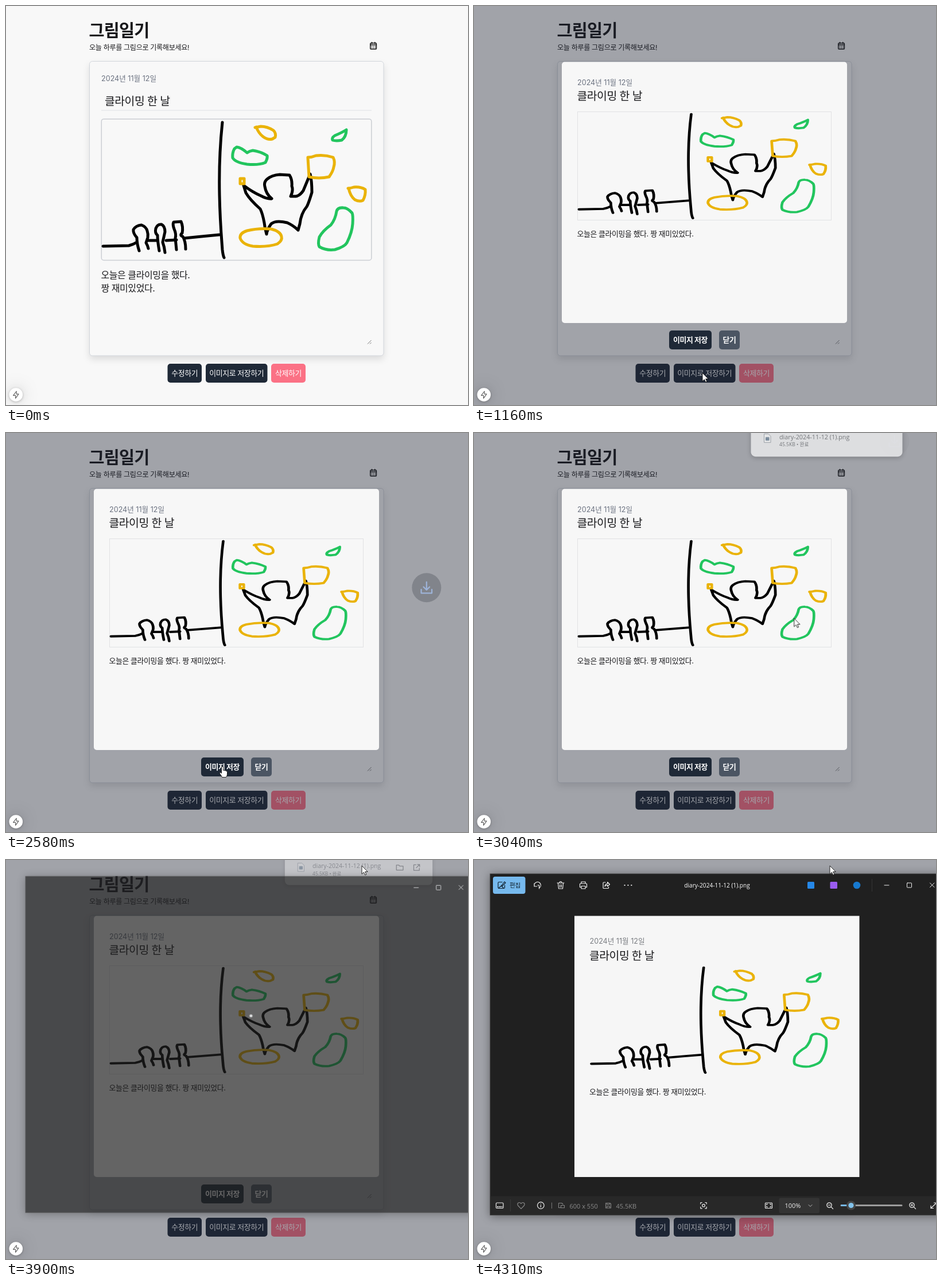
Write an HTML page that moves like this. It is 805x696 px and loops after 4510 ms.

```html
<!DOCTYPE html>
<html lang="ko">
<head>
<meta charset="utf-8">
<title>그림일기</title>
<style>
html, body { margin: 0; width: 100%; height: 100%; overflow: hidden; background: #f8f8f8; }
svg { display: block; }
text { font-family: Inter, "Noto Sans CJK KR", "Noto Sans CJK", sans-serif; white-space: pre; }
.ko { letter-spacing: -.028em; }
.ui { font-family: "Open Sans", "Noto Sans", "Noto Sans CJK KR", sans-serif; }
.line { fill: none; stroke-linecap: round; stroke-linejoin: round; }
.card { filter: drop-shadow(0 6px 6px rgba(0,0,0,.11)); }
.dev { filter: drop-shadow(0 0 14px rgba(0,0,0,.17)) drop-shadow(0 1px 2px rgba(0,0,0,.25)); }

.modal, .disc, .popup, .hover, .win, .ring, .content, .busy, .knob, .fill, .cursor, .arrow, .hand, .tap {
  animation: 4510ms linear infinite both;
}
.modal { animation-name: modal; }
.disc { animation-name: disc; }
.popup { animation-name: popup; transform-origin: 614.5px 0; }
.win { animation-name: win; transform-origin: 426px 322px; }
.ring { animation-name: ring; transform-origin: 426px 290px; }
.cursor { animation-name: cursor; }
.arrow { animation-name: arrow; }
.hand { animation-name: hand; }
.tap { animation-name: tap; }
.hover { animation-name: hover; }
.content { animation-name: content; }
.busy { animation-name: busy; }
.knob { animation-name: knob; }
.fill { animation-name: fill; stroke-dasharray: 18 40; }
.arrow, .hand, .tap, .hover, .content, .busy, .knob, .fill { animation-timing-function: step-end; }

@keyframes modal {
  0%, 20.7% { opacity: 0; }
  25.2%, 100% { opacity: 1; }
}
@keyframes disc {
  0%, 57.1% { opacity: 0; transform: none; }
  57.2% { opacity: 1; transform: none; }
  60.5% { opacity: 1; transform: none; animation-timing-function: ease-in; }
  66% { opacity: .6; transform: translateY(-200px); }
  67.8%, 100% { opacity: 0; transform: translateY(-270px); }
}
@keyframes popup {
  0%, 65% { opacity: 0; transform: translateY(-16px); }
  68.2%, 85% { opacity: 1; transform: none; }
  86.47% { opacity: .45; transform: scale(.975); }
  87.6%, 100% { opacity: 0; transform: scale(.955); }
}
@keyframes win {
  0%, 85.2% { opacity: 0; transform: scale(.96); }
  86.47% { opacity: .68; transform: scale(.985); }
  88.2%, 100% { opacity: 1; transform: none; }
}
@keyframes ring {
  0%, 86.4% { transform: rotate(-90deg); stroke: #ddd; stroke-dasharray: .1 200; }
  89.8% { transform: rotate(-14deg); stroke: #76b9ed; stroke-dasharray: 10.5 200; }
  92.2% { transform: rotate(60deg); stroke: #76b9ed; stroke-dasharray: 30 200; visibility: visible; }
  92.24%, 100% { transform: rotate(60deg); stroke: #76b9ed; stroke-dasharray: 30 200; visibility: hidden; }
}
@keyframes cursor {
  0%, 8.65% { transform: translate(779px, 690px); }
  12% { transform: translate(660px, 606px); }
  15.2% { transform: translate(490px, 566px); }
  17.6% { transform: translate(386px, 594px); animation-timing-function: ease-out; }
  20.18%, 30% { transform: translate(398px, 640px); animation-timing-function: ease-in-out; }
  39.4%, 42% { transform: translate(390px, 590px); }
  45%, 57.5% { transform: translate(377px, 582px); animation-timing-function: ease-in-out; }
  68.29%, 69.84% { transform: translate(560px, 320px); animation-timing-function: ease-in-out; }
  80.93%, 100% { transform: translate(620px, 10px); }
}
@keyframes arrow {
  0% { visibility: hidden; }
  8.65% { visibility: visible; }
  19.1% { visibility: hidden; }
  21.29% { visibility: visible; }
  37.5% { visibility: hidden; }
  58.8%, 100% { visibility: visible; }
}
@keyframes hand {
  0% { visibility: hidden; }
  19.1% { visibility: visible; }
  21.29% { visibility: hidden; }
  37.5% { visibility: visible; }
  58.8%, 100% { visibility: hidden; }
}
@keyframes tap {
  0% { visibility: hidden; }
  51.66% { visibility: visible; }
  52.77%, 100% { visibility: hidden; }
}
@keyframes hover {
  0% { visibility: hidden; }
  79.8%, 100% { visibility: visible; }
}
@keyframes content {
  0% { visibility: hidden; }
  92.24%, 100% { visibility: visible; }
}
@keyframes busy {
  0% { visibility: hidden; }
  87.58% { visibility: visible; }
  94.46%, 100% { visibility: hidden; }
}
@keyframes knob {
  0% { transform: translateX(-12px); }
  95.56%, 100% { transform: none; }
}
@keyframes fill {
  0% { stroke-dashoffset: 12; }
  95.56%, 100% { stroke-dashoffset: 0; }
}
</style>
</head>
<body>
<svg width="805" height="696" viewBox="0 0 805 696">
  <defs>
    <g id="art" class="line" stroke-width="5">
      <g stroke="#000">
        <path d="M377 203C373 240 371 280 372 330C373 380 376 410 377 425Q378 435 380 439"/>
        <path d="M169 419L214 418Q222 416 228 412M246 409H263M279 409L297 408M311 405Q340 402 372 399"/>
        <path d="M232 427Q228 415 228 404Q221 396 222 390Q226 383 236 382Q244 385 246 392Q248 398 247 404L244 413Q247 418 248 423"/>
        <path d="M267 427Q264 410 264 400Q259 396 261 388Q264 380 271 381Q277 384 277 394L273 412Q276 420 277 430"/>
        <path d="M297 425L295 405Q297 398 293 389Q290 381 292 377L305 376Q309 385 307 396Q302 400 308 402Q313 410 313 424"/>
        <path d="M463 336Q453 328 451 315Q449 307 455 302Q463 295 477 294L494 295Q499 303 498 314Q501 322 496 332L505 332Q512 331 518 322L530 293Q533 305 533 325Q527 345 524 350Q514 362 512 380L509 391Q501 383 490 378Q470 373 462 380Q455 390 454 398Q451 388 450 378Q447 362 443 354Q425 338 418 326L414 313Q430 325 444 331Q455 337 463 336"/>
      </g>
      <g stroke="#eab308">
        <path d="M436 211Q440 222 448 228Q456 234 464 232L469 229Q471 222 466 217Q455 210 444 210L434 212"/>
        <path d="M526 265L528 298Q545 302 563 298Q570 288 571 281Q574 272 570 264Q555 259 540 261Q533 264 526 264"/>
        <path d="M408 301H415V310H408Z"/>
        <path d="M597 318Q600 332 608 338Q616 342 622 339Q627 330 626 320Q618 315 606 316Q600 318 596 318"/>
        <path d="M420 392Q407 396 408 405Q412 416 430 419Q455 421 473 415Q482 409 480 402Q478 393 462 389Q440 387 420 392Z"/>
      </g>
      <g stroke="#22c55e">
        <path d="M398 249Q394 256 395 265Q400 273 420 276Q440 278 452 273Q456 266 455 261Q444 254 430 252Q424 253 420 256Q410 247 402 246Z"/>
        <path d="M593 216Q593 228 585 234Q575 236 569 234Q567 230 573 226Q585 221 593 216"/>
        <path d="M588 352Q578 351 576 358Q574 372 566 382Q552 392 546 403Q543 415 546 420Q558 427 573 425Q590 420 594 413Q603 395 604 380Q605 365 603 361Q595 352 588 352Z"/>
      </g>
    </g>
    <g id="folder" class="line" stroke-width="1.3">
      <path d="M-6 -4.5H-2L0 -2.5H6V4.5H-6Z"/>
    </g>
    <g id="lens" class="line" stroke-width="1.2">
      <circle cx="-1" cy="-1" r="4.2"/><path d="M2.2 2.2L5.5 5.5M-3 -1H1"/>
    </g>
  </defs>

  <rect width="805" height="696" fill="#f8f8f8"/>
  <text class="ko" x="144.5" y="53" font-size="29.4" font-weight="800" fill="#18181b">그림일기</text>
  <text class="ko" x="145" y="76.5" font-size="12.1" fill="#18181b">오늘 하루를 그림으로 기록해보세요!</text>
  <g class="line" stroke="#111" stroke-width="1.5">
    <rect x="634.8" y="64.8" width="10.6" height="10.4" rx="1.3"/>
    <path d="M635 67.8H645M637.5 63.2V65.5M642.7 63.2V65.5"/>
    <path d="M637.4 70.5H643.5M637.4 73H643.5" stroke-dasharray=".1 2.9"/>
  </g>
  <rect class="card" x="145.5" y="96.5" width="512.5" height="513.5" rx="5" fill="#f8f8f8" stroke="#d1d5db"/>
  <text x="166" y="130.5" font-size="12.6" fill="#6b7280">2024년 11월 12일</text>
  <text class="ko" x="172" y="173" font-size="19.4" fill="#18181b">클라이밍 한 날</text>
  <path d="M166 182H637" stroke="#dfe1e5"/>
  <rect x="166.3" y="197.2" width="470.5" height="246.3" rx="4" fill="none" stroke="#cbced4" stroke-width="1.5"/>
  <use href="#art"/>
  <text class="ko" font-size="16" fill="#18181b"><tspan x="165.5" y="475">오늘은 클라이밍을 했다.</tspan><tspan x="165.5" y="498">짱 재미있었다.</tspan></text>
  <path d="M630 589.5L636.5 583M634 589.5L636.5 587" stroke="#666" stroke-width=".9"/>
  <g fill="#1f2937">
    <rect x="281.5" y="624" width="59.5" height="33" rx="5"/>
    <rect x="348" y="624" width="107.5" height="33" rx="5"/>
    <rect x="462" y="624" width="60" height="33" rx="5" fill="#fb7185"/>
  </g>
  <g class="ko" font-size="12.9" font-weight="500" fill="#fff" text-anchor="middle">
    <text x="311.3" y="644.8">수정하기</text>
    <text x="401.7" y="644.8">이미지로 저장하기</text>
    <text x="492" y="644.8">삭제하기</text>
  </g>

  <g class="modal">
    <rect width="805" height="696" fill="#1f2533" fill-opacity=".4"/>
    <rect x="153" y="97.5" width="497" height="455.5" rx="5" fill="#f7f7f7"/>
    <text x="180" y="137.8" font-size="12.6" fill="#6b7280">2024년 11월 12일</text>
    <text class="ko" x="179.5" y="164" font-size="19.4" fill="#18181b">클라이밍 한 날</text>
    <rect x="180.5" y="184.5" width="442" height="189" fill="none" stroke="#e1e2e4"/>
    <use href="#art" transform="translate(23.9 32.5) scale(.9406 .769)"/>
    <text class="ko" x="179.5" y="401.5" font-size="12.85" fill="#18181b">오늘은 클라이밍을 했다. 짱 재미있었다.</text>
    <rect x="340" y="566" width="74" height="33" rx="5" fill="#1f2937"/>
    <rect x="427" y="566" width="36" height="33" rx="5" fill="#4b5563"/>
    <g class="ko" font-size="12.9" font-weight="700" fill="#fff" text-anchor="middle">
      <text x="377" y="586.8">이미지 저장</text>
      <text x="445" y="586.8">닫기</text>
    </g>
  </g>

  <g class="dev">
    <circle cx="17.3" cy="678" r="11.8" fill="#fff"/>
    <path class="line" d="M18.2 672L12.6 679.3H16.6V684.3L22 676.8H18.2Z" stroke="#666" stroke-width="1.2"/>
  </g>

  <g class="disc">
    <circle cx="732.8" cy="269.8" r="25.5" fill="#81848b"/>
    <path class="line" d="M732.8 260V273M727.5 268.5L732.8 273.8L738 268.5M723.5 273V279.3H742V273" stroke="#9db3d8" stroke-width="2.3"/>
  </g>

  <g class="popup">
    <rect x="482.5" y="-40" width="264" height="85" rx="8" fill="#f1f1f2" style="filter:drop-shadow(0 2px 4px rgba(0,0,0,.3))"/>
    <path d="M505.5 5.5H513L517 9.5V20.5H505.5Z" fill="#fafafa" stroke="#9aa0a8"/>
    <rect x="508" y="11" width="6.5" height="6" rx="1" fill="#71869b"/>
    <g class="ui" fill="#66686c">
      <text class="ui" x="532" y="14.8" font-size="10.8">diary-2024-11-12 (1).png</text>
      <text class="ui" x="532" y="27.3" font-size="8.6">45.5KB • 완료</text>
    </g>
    <g class="hover" stroke="#606266">
      <use href="#folder" x="688" y="13.5"/>
      <path class="line" d="M717 8.5H713V18.5H723V14.5M719.5 8H723.5V12M723.3 8.2L717.5 14" stroke-width="1.3"/>
    </g>
  </g>

  <g class="win">
    <rect x="28" y="24" width="796" height="595.5" fill="#202020" stroke="#4a4a4a" stroke-width=".8" style="filter:drop-shadow(0 2px 8px rgba(0,0,0,.4))"/>
    <g class="line" stroke="#eee" stroke-width="1">
      <path d="M715 44H723M794.5 40L802 47.5M802 40L794.5 47.5"/>
      <rect x="754.5" y="40" width="8" height="8" rx=".8"/>
    </g>
    <circle class="line ring" cx="426" cy="290" r="19" stroke-width="5"/>

    <g class="content">
      <rect x="33" y="29" width="56.5" height="30" rx="4" fill="#76b9ed"/>
      <g class="line" stroke="#10202c" stroke-width="1.2">
        <path d="M49 38.5H43.5Q42 38.5 42 40V48Q42 49.5 43.5 49.5H52Q53.5 49.5 53.5 48V44M43 49L47.5 45L51.5 49M48 44.5L53 38L55 39.8L49.5 45Z"/>
      </g>
      <text class="ko" x="62" y="48" font-size="10.6" fill="#10202c">편집</text>
      <g class="line" stroke="#f2f2f2" stroke-width="1.2">
        <path d="M105.5 46A5.6 5.6 0 1 1 114 48.5M105 41V46H110M111 44H113.5V50"/>
        <path d="M145 40H157M149 40Q149 37.5 151 37.5Q153 37.5 153 40M146.5 40.5L147.5 50H154.5L155.500 40.5M149.700 43V47.500M152.300 43V47.500"/>
        <path d="M187 41V38H194V41M187 47.5H184.500V42Q184.500 41 185.500 41H195.500Q196.500 41 196.500 42V47.500H194M187 45.500H194V50H187Z"/>
        <path d="M229 39H226Q225 39 225 40V48.500Q225 49.500 226 49.500H233.500Q234.500 49.500 234.500 48.500V47M228 46Q228.500 41.500 232.500 41.500V38.500L236.500 42.500L232.500 46V43.700Q229.500 43.700 228 46"/>
        <path d="M262.500 44H275" stroke-width="2.200" stroke-dasharray=".1 5.800"/>
      </g>
      <text class="ui" x="423.5" y="47.8" font-size="10.1" fill="#fff" text-anchor="middle">diary-2024-11-12 (1).png</text>
      <rect x="581" y="38" width="12" height="12" rx="1.5" fill="#2688e8"/>
      <rect x="620.5" y="38" width="12.5" height="12" rx="1.5" fill="#9a5cf0"/>
      <circle cx="667" cy="44" r="6.3" fill="#1779cf"/>
      <path d="M693.5 33V55" stroke="#343434"/>

      <rect x="175" y="97.5" width="496.500" height="455.500" fill="#f6f6f6"/>
      <text x="201.500" y="145.500" font-size="12.6" fill="#7a7d82">2024년 11월 12일</text>
      <text class="ko" x="201" y="174" font-size="19.4" font-weight="500" fill="#18181b">클라이밍 한 날</text>
      <use href="#art" transform="translate(45.6 29.9) scale(.9406 .777)"/>
      <text class="ko" x="201" y="409" font-size="12.85" fill="#18181b">오늘은 클라이밍을 했다. 짱 재미있었다.</text>

      <rect x="28.500" y="586.500" width="795" height="32.500" fill="#282828"/>
      <path d="M63.500 592V613" stroke="#3a3a3a"/>
      <path d="M135.500 597.500V608" stroke="#777"/>
      <g class="line" stroke="#eee" stroke-width="1.200">
        <rect x="38.500" y="598" width="12.500" height="9.500" rx="1.500"/>
        <path d="M41 605H48.500" stroke-width="2" stroke-dasharray="1 2.700"/>
        <path d="M82 608.300L76.800 603Q74.800 600 77.200 598Q80 596.500 82 599.500Q84 596.500 86.800 598Q89.200 600 87.200 603Z" stroke="#888"/>
        <circle cx="116.300" cy="602.500" r="5.800"/>
        <path d="M116.300 602V605.500M116.300 599.700V599.800"/>
        <path d="M394.800 600V597.500H397.300M402.700 597.500H405.200V600M405.200 605V607.800H402.700M397.300 607.800H394.800V605"/>
        <circle cx="400" cy="602.700" r="2.300"/>
        <rect x="507.500" y="598" width="12" height="9.500" rx="1"/>
        <path d="M509.800 601.500V600.200H511.200M515.800 600.200H517.200V601.500M517.200 604V605.300H515.800M511.200 605.300H509.800V604"/>
        <path d="M801.500 598H806V602.500M806 598L796 607.500M796 603V607.500H800.500"/>
      </g>
      <g class="line" stroke="#858585" stroke-width="1.100">
        <path d="M151 606.500H147.500V598.500H153L155 600.500M151.500 602.500H157.500V606.800H151.500Z"/>
        <path d="M229.500 598.500H237L238.500 600V607H229.500ZM231.500 598.500V601H236V598.500M231.500 607V604H236.500V607"/>
      </g>
      <g fill="#8b8b8b" font-size="11">
        <text class="ui" x="166.500" y="607.500">600 x 550</text>
        <text class="ui" x="247.500" y="607.500">45.5KB</text>
      </g>
      <rect x="531.500" y="589.500" width="70.500" height="26.500" rx="3" fill="#343434"/>
      <text class="ui" x="541.500" y="606.800" font-size="11" fill="#eee">100%</text>
      <path class="line" d="M583 601.500L586 604.500L589 601.500" stroke="#bbb"/>
      <use href="#lens" x="620" y="603" stroke="#eee"/>
      <use href="#lens" x="764" y="603" stroke="#eee"/>
      <path d="M763 600V604" stroke="#eee" stroke-width="1.200"/>
      <g class="line" stroke-width="3">
        <path d="M640 602.500H745" stroke="#9c9c9c"/>
        <path class="fill" d="M639.500 602.500H657.500" stroke="#76b9ed" style="stroke-linecap:butt"/>
      </g>
      <g class="knob">
        <circle cx="657" cy="602.500" r="8" fill="#454545"/>
        <circle cx="657" cy="602.500" r="4.600" fill="#82c3ec"/>
      </g>
    </g>
  </g>

  <circle class="busy" cx="631.500" cy="9.500" r="4.700" fill="#9fd2f3" stroke="#2b94e0" stroke-width="3.200"/>
  <circle class="tap" cx="376" cy="582" r="10" fill="#fff" fill-opacity=".25"/>
  <g class="cursor" stroke="#111" stroke-width=".9" stroke-linejoin="round" fill="#fff">
    <path class="arrow" d="M0 0V14.500L3.400 11.400L5.700 16.200L7.900 15.200L5.700 10.500H10.200Z"/>
    <path class="hand" d="M-1.500 1Q-1.500 -.3 0 -.3Q1.500 -.3 1.500 1V6.500Q3 5.500 4 7Q5.500 6 6.500 7.700Q8.500 7.200 8.500 9.500V13Q8.500 16 6.500 18.500H-.5Q-2 15 -4.700 12Q-5 10 -3.500 10L-1.500 11.500Z"/>
  </g>
</svg>
</body>
</html>
```
